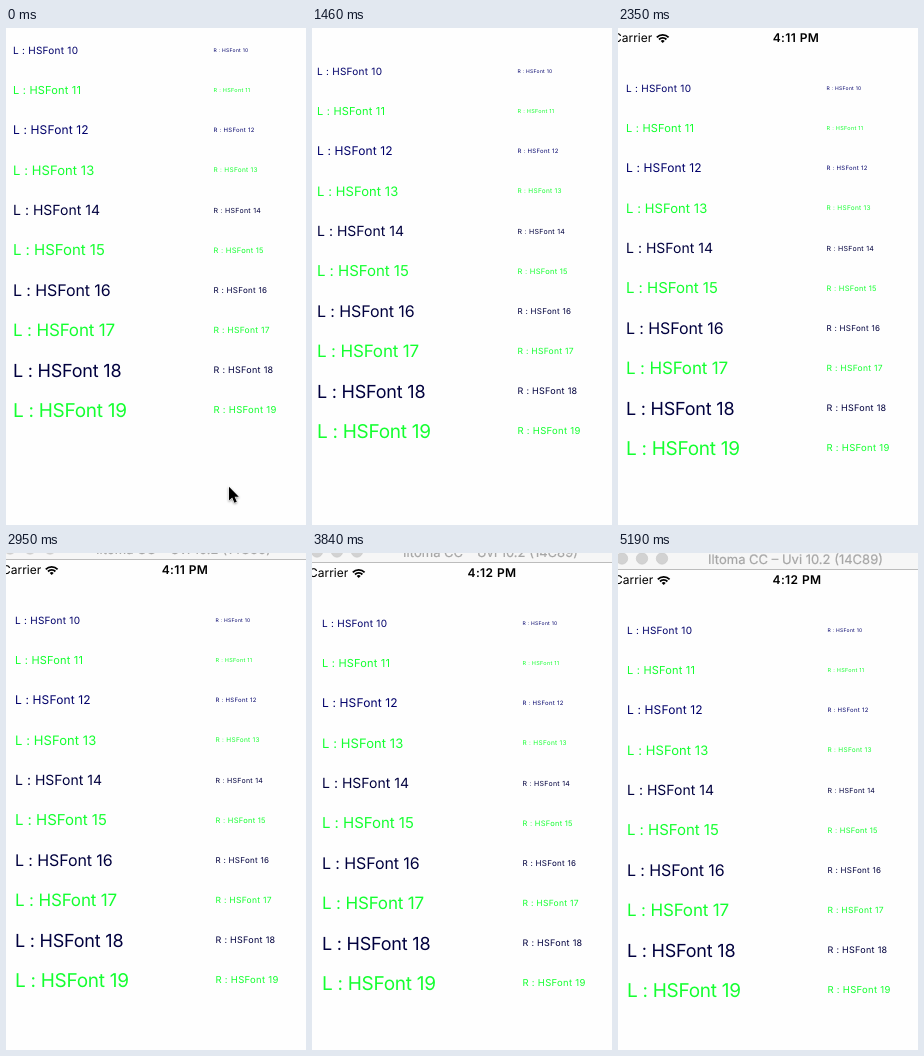
An HTML page that plays this animation: 300 by 497 pixels, repeating every 8180 ms.

```html
<!DOCTYPE html>
<html lang="en">
<head>
<meta charset="utf-8">
<title>Font sizes</title>
<style>
  html, body { margin: 0; width: 100%; height: 100%; overflow: hidden; background: #fefefe; }
  svg { display: block; width: 100%; height: 100%; }
  text { font-family: Inter, Roboto, sans-serif; white-space: pre; text-rendering: geometricPrecision; }
  #clock { font-size: 12px; font-weight: 600; letter-spacing: .4px; text-anchor: middle; }
  #cursor { filter: drop-shadow(0 1px 1px #0006); }
</style>
</head>
<body>
<svg viewBox="0 0 300 497">
  <g id="screen">
    <g id="titlebar">
      <rect x="-20" y="-61" width="340" height="22" fill="#f6f6f6"/>
      <rect x="-20" y="-39" width="340" height="1" fill="#bcbcbc"/>
      <g fill="#d2d2d2" stroke="#c6c6c6" stroke-width=".6">
        <circle cx="2" cy="-49.5" r="5.7"/>
        <circle cx="22" cy="-49.5" r="5.7"/>
        <circle cx="42" cy="-49.5" r="5.7"/>
      </g>
      <text x="175.5" y="-44.3" font-size="13" text-anchor="middle" fill="#a6a6a6" stroke="#a6a6a6" stroke-width=".2">Iltoma CC – Uvi 10.2 (14C89)</text>
    </g>
    <g id="status">
      <text x="-6" y="-23.6" font-size="12">Carrier</text>
      <g transform="translate(43.7 -23.4)" fill="none" stroke="#000" stroke-width="1.8">
        <path d="M-5.9 -5.3A8.3 8.3 0 0 1 5.9 -5.3"/>
        <path d="M-3.7 -3.1A5.2 5.2 0 0 1 3.7 -3.1"/>
        <path d="M0 .3L-2 -1.7A2.8 2.8 0 0 1 2 -1.7Z" fill="#000" stroke="none"/>
      </g>
      <g id="clock">
        <text id="before" x="177" y="-23.6">4:11 PM</text>
        <text id="after" x="177" y="-23.6">4:12 PM</text>
      </g>
    </g>
    <g id="rows"></g>
  </g>
  <path id="cursor" d="M1 .8V14.6L4.2 11.6L6.4 16.8L8.8 15.8L6.6 10.7H10.8Z" stroke="#fff" paint-order="stroke"/>
</svg>
<script>
const LOOP = 8180;
const TICK = 148;
const CAP_HALF = 0.364;
const byId = id => document.getElementById(id);

function addLabel(text, x, centerY, size, tracking, fill) {
  const label = document.createElementNS('http://www.w3.org/2000/svg', 'text');
  const attributes = {
    x, y: centerY + size * CAP_HALF, fill,
    'font-size': size, 'letter-spacing': tracking
  };
  for (const name in attributes) label.setAttribute(name, attributes[name]);
  label.textContent = text;
  byId('rows').append(label);
}

for (let size = 10; size < 20; size++) {
  const index = size - 10;
  const y = 22 + index * 40;
  const fill = size % 2 ? '#14ff30' : size < 14 ? '#00006a' : '#00003e';
  addLabel(`L : HSFont ${size}`, 7, y, size, 0.26 - 0.06 * index, fill);
  addLabel(`R : HSFont ${size}`, 207.5, y, size / 2, 0.28, fill);
}

const move = (time, x, y) => ({ time, transform: `translate(${x}px, ${y}px)` });
const fade = (time, opacity) => ({ time, opacity });

// Every step holds until the next one.
function play(id, steps) {
  const frames = steps.map(({ time, ...style }) => ({
    offset: time / LOOP, easing: 'step-end', ...style
  }));
  frames.push({ ...frames.at(-1), offset: 1 });
  byId(id).animate(frames, { duration: LOOP, iterations: Infinity });
}

// One pull on the window, sampled once per tick; sideways drift lags behind.
function drag({ start, end, from, to, power }) {
  const count = Math.round((end - start) / TICK);
  const mix = (axis, amount) => Math.round(from[axis] + (to[axis] - from[axis]) * amount);
  return Array.from({ length: count + 1 }, (_, i) => {
    const progress = i / count;
    return move(start + (end - start) * progress,
      mix(0, progress ** (power * 3)), mix(1, progress ** power));
  });
}

const drags = [
  { start: 1170, end: 1750, from: [-2, 16], to: [1, 28], power: 1.3 },
  { start: 2200, end: 2950, from: [1, 32], to: [2, 45], power: 0.45 },
  { start: 3090, end: 3840, from: [3, 45], to: [3, 48], power: 4 },
  { start: 4590, end: 5190, from: [3, 51], to: [2, 55], power: 3 }
];
play('screen', [move(0, 0, 0), ...drags.flatMap(drag)]);

const cursorPath = [[222, 458], [164, 448], [143, 418], [146, 471], [158, 484]];
play('cursor', cursorPath.map(([x, y], i) => move(i * 150, x, y)));
play('cursor', [fade(0, 1), fade(750, 0)]);

play('before', [fade(0, 1), fade(3540, 0)]);
play('after', [fade(0, 0), fade(3540, 1)]);
</script>
</body>
</html>
```
